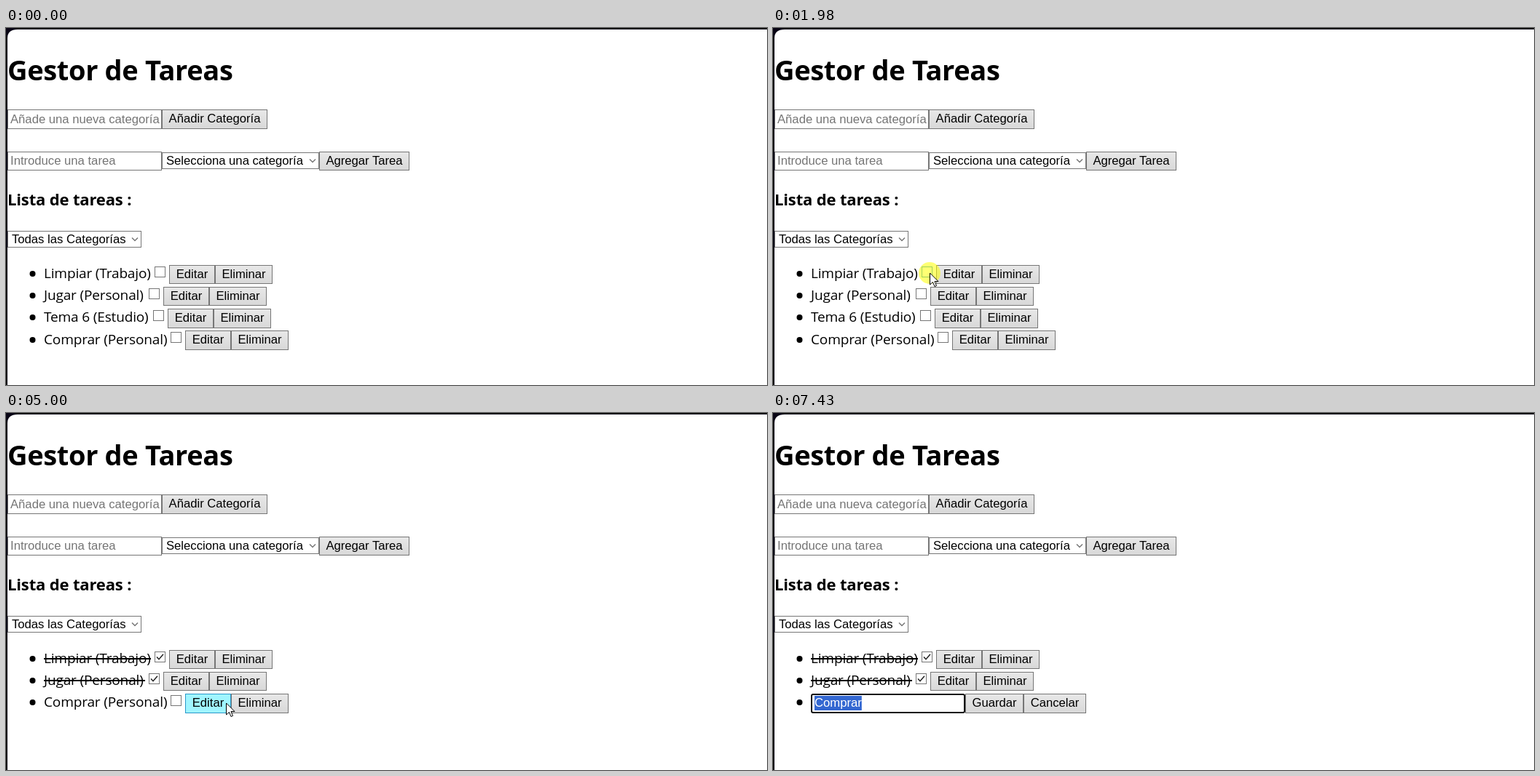
An HTML page for the animation above (8000 ms loop, 1045 px wide and 491 px high).

```html
<!DOCTYPE html>
<html lang="es">
<head>
<meta charset="utf-8">
<title>Gestor de Tareas</title>
<style>
html, body { margin: 0; width: 100%; height: 100%; overflow: hidden; background: #080414; }
svg { display: block; }
text { white-space: pre; }
.ui { font: 16.667px 'Liberation Sans', Arial, sans-serif; }
.body { font: 19px 'Open Sans', 'Noto Sans', sans-serif; letter-spacing: -.15px; }
.h1 { font: bold 38px 'Open Sans', 'Noto Sans', sans-serif; letter-spacing: -.35px; }
.h3 { font: bold 22px 'Open Sans', 'Noto Sans', sans-serif; letter-spacing: -.15px; }
</style>
</head>
<body>
<svg width="1045" height="491" viewBox="0 0 1045 491">
  <defs>
    <linearGradient id="face" x2="0" y2="1">
      <stop stop-color="#e8e8e8"/><stop offset="1" stop-color="#d8d8d8"/>
    </linearGradient>
  </defs>
  <path d="M2 491V14Q2 2 16 2H1045V491Z" fill="#fff"/>
  <g id="page"></g>
  <g id="list"></g>
</svg>
<script>
const GRAY = '#767676', BLUE = '#2b97c9', LOOP = 8000;
const $ = id => document.getElementById(id);

const text = (cls, x, y, s, extra = '') => `<text class="${cls}" x="${x}" y="${y}" ${extra}>${s}</text>`;
const box = (x, y, w, h, fill = '#fff', stroke = GRAY) =>
  `<rect x="${x + .5}" y="${y + .5}" width="${w - 1}" height="${h - 1}" fill="${fill}" stroke="${stroke}"/>`;
const button = (x, y, w, label, state = 0, h = 26) =>
  box(x, y, w, h, ['url(#face)', '#a0f5ff', '#80e4f8'][state], state ? BLUE : GRAY) +
  text('ui', x + w / 2, y + 18, label, 'text-anchor="middle"');
const select = (x, y, w, label) => box(x, y, w, 23) + text('ui', x + 6, y + 17, label) +
  `<path d="M${x + w - 13} ${y + 9.5}l4 4 4-4" fill="none" stroke="#777" stroke-width="1.5"/>`;

$('page').innerHTML =
  text('h1', 2, 72, 'Gestor de Tareas') +
  box(2, 112, 212, 27) + text('ui', 6, 131, 'Añade una nueva categoría', 'fill="#757575"') +
  button(214, 112, 145, 'Añadir Categoría', 0, 27) +
  box(2, 170, 212, 26) + text('ui', 6, 188, 'Introduce una tarea', 'fill="#757575"') +
  select(214, 171, 216, 'Selecciona una categoría') +
  button(430, 170, 124, 'Agregar Tarea') +
  text('h3', 2, 244, 'Lista de tareas :') +
  select(2, 279, 184, 'Todas las Categorías');

// label, checkbox x, time it is ticked, time it is removed
const tasks = [
  ['Limpiar (Trabajo)', 204, 2210],
  ['Jugar (Personal)', 196, 3470],
  ['Tema 6 (Estudio)', 202, Infinity, 5000],
  ['Comprar (Personal)', 226]
];

// start, end, from, to, easing power
const moves = [
  [320, 1100, 849, 485, 270, 347, 2],
  [1130, 1710, 270, 347, 215, 337, 2],
  [2590, 3010, 215, 337, 204, 358, 2],
  [3900, 3980, 204, 358, 245, 371, 1],
  [3980, 4370, 245, 371, 302, 399, 2],
  [6240, 6690, 302, 399, 179, 401, 2],
  [7050, 7200, 179, 401, 100, 397, 1],
  [7200, 7430, 100, 397, -20, 413, 1]
];
const presses = [[1980, 2230], [3240, 3490], [4790, 5000], [5610, 5840], [6870, 7430]];
const EDIT = 5840, FOCUS = 6890, DRAG = 7050;

function pointer(t) {
  const [a, b, x0, y0, x1, y1, pow] = moves.findLast(m => t >= m[0]) || moves[0];
  const u = Math.min(1, Math.max(0, (t - a) / (b - a)));
  const e = 1 - (1 - u) ** pow;
  return [x0 + (x1 - x0) * e, y0 + (y1 - y0) * e];
}

// Editable field: letters right of the dragged pointer are selected
function field(t, px, hover) {
  const word = 'Comprar', widths = [.722, .556, .833, .556, .333, .556, .333].map(w => w * 16.667);
  const end = 57 + widths.reduce((a, b) => a + b);
  let from = word.length, x = end;
  if (t >= DRAG) while (from && px < x - widths[from - 1] / 2) x -= widths[--from];
  const frame = t >= FOCUS
    ? '<rect x="53" y="387" width="210" height="25" rx="2" fill="#fff" stroke="#101010" stroke-width="2"/>'
    : box(52, 386, 212, 27, '#fff', hover ? BLUE : GRAY);
  const mark = from < word.length
    ? `<rect x="${x}" y="389" width="${end - x}" height="20" fill="#3367d1"/>`
    : t >= FOCUS ? `<path d="M${Math.round(end) + .5} 389v19" stroke="#000"/>` : '';
  return frame + mark + text('ui', 57, 404,
    `${word.slice(0, from)}<tspan fill="#fff">${word.slice(from)}</tspan>`);
}

function draw(t) {
  const [px, py] = pointer(t);
  const shown = t >= 320 && t < 7430;
  const down = presses.some(([a, b]) => t >= a && t < b);
  const over = (x, y, w, h) => shown && px >= x && px < x + w && py >= y && py < y + h;
  const state = (x, y, w) => over(x, y, w, 26) ? (down ? 2 : 1) : 0;
  let out = '', beam = false;

  tasks.filter(k => !(t >= k[3])).forEach(([label, cx, ticked], i) => {
    const y = 326 + i * 30, base = y + 18 + (i > 2), bx = cx + 20;
    out += `<circle cx="36.5" cy="${base - 6}" r="4"/>`;
    if (t >= EDIT && i === 2) {
      beam = over(52, y, 212, 27) || (shown && t >= DRAG);
      out += field(t, px, beam) + button(264, y, 80, 'Guardar', state(264, y, 80), 27) +
        button(344, y, 86, 'Cancelar', state(344, y, 86), 27);
      return;
    }
    out += text('body', 52, base, label) +
      box(cx, y + 2, 15, 15, '#fff', over(cx, y + 2, 15, 15) ? BLUE : GRAY);
    if (t >= ticked)
      out += `<path d="M52 ${y + 12}H${cx - 5}" stroke="#000" stroke-width="1.8"/>` +
        `<path d="M${cx + 3} ${y + 9.5}l3 3.2 6-7" fill="none" stroke="#222" stroke-width="1.5"/>`;
    const h = i > 1 ? 27 : 26;
    out += button(bx, y, 63, 'Editar', state(bx, y, 63), h) +
      button(bx + 63, y, 79, 'Eliminar', state(bx + 63, y, 79), h);
  });

  if (shown) {
    if (down) out += `<circle cx="${px}" cy="${py}" r="15" fill="#ff0" fill-opacity=".55"/>`;
    out += `<g transform="translate(${Math.round(px) + .5} ${Math.round(py)})">` + (beam
      ? '<path d="M-2-7.5h3l1 1 1-1h3M-2 8.5h3l1-1 1 1h3M2-7V8" fill="none" stroke="#222"/>'
      : '<path d="M0 0V16L4 12.5 6.5 18.5 9 17.5 6.5 11.5H11.5Z" fill="#fff" stroke="#000"/>') + '</g>';
  }
  $('list').innerHTML = out;
}

function tick() {
  draw(performance.now() % LOOP);
  requestAnimationFrame(tick);
}
draw(0);
requestAnimationFrame(tick);
</script>
</body>
</html>
```
